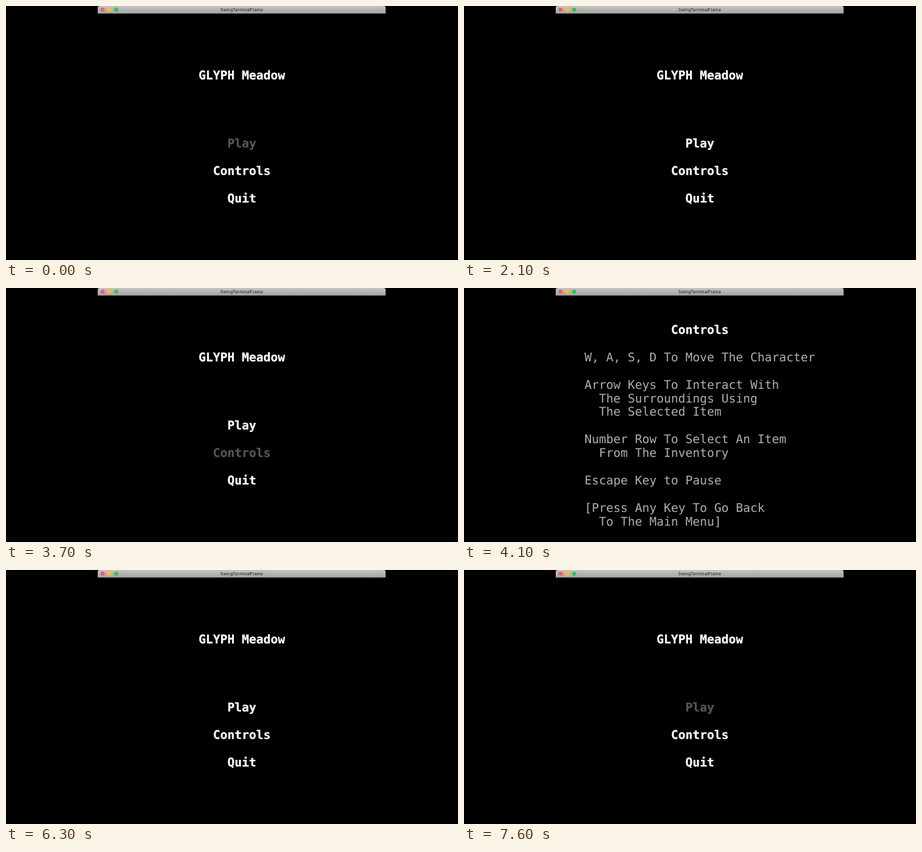
Recreate the animation shown at these times as an HTML page. Size 690 by 388 pixels, loop 8 s.

```html
<!DOCTYPE html>
<html lang="en">
<head>
<meta charset="utf-8">
<title>Terminal menu</title>
<style>
  html, body { margin: 0; width: 100%; height: 100%; overflow: hidden; background: #000; }
  svg { display: block; width: 690px; height: 388px; }
  text { white-space: pre; text-rendering: geometricPrecision; }
  .term { font: 18.27px "DejaVu Sans Mono", monospace; color: #b0b0b0; fill: currentColor; }
  .bold { font-weight: bold; color: #fff; stroke: currentColor; stroke-width: .25px; }
  .bar { font: 6.62px Inter, "Liberation Sans", sans-serif; fill: #1c1c1c; }
</style>
</head>
<body>
<svg viewBox="0 0 690 388">
  <defs>
    <linearGradient id="metal" x2="0" y2="1">
      <stop offset="0" stop-color="#c4c4c4"/>
      <stop offset="1" stop-color="#a4a4a4"/>
    </linearGradient>
  </defs>
  <path d="M140 11.6V3q0-3 3-3H576.5q3 0 3 3V11.6Z" fill="url(#metal)"/>
  <circle cx="147.5" cy="5.6" r="3.2" fill="#fc5b55"/>
  <circle cx="157.9" cy="5.6" r="3.2" fill="#fdbc38"/>
  <circle cx="168.2" cy="5.6" r="3.2" fill="#2fc740"/>
  <text class="bar" x="359.7" y="8.1" text-anchor="middle">SwingTerminalFrame</text>
  <g id="menu"></g>
  <g id="help"></g>
</svg>
<script>
const LOOP = 8000;
const menu = document.getElementById('menu');
const help = document.getElementById('help');

// Places text on the 40-column terminal grid.
function put(parent, col, row, str, bold) {
  const t = document.createElementNS('http://www.w3.org/2000/svg', 'text');
  t.setAttribute('class', bold ? 'term bold' : 'term');
  t.setAttribute('x', 140 + col * 11);
  t.setAttribute('y', 28 + row * 20.93);
  t.textContent = str;
  parent.append(t);
  return t;
}

put(menu, 14, 4, 'GLYPH Meadow', true);
const play = put(menu, 18, 9, 'Play', true);
const controls = put(menu, 16, 11, 'Controls', true);
put(menu, 18, 13, 'Quit', true);

put(help, 16, 2, 'Controls', true);
[
  [4, 4, 'W, A, S, D To Move The Character'],
  [4, 6, 'Arrow Keys To Interact With'],
  [6, 7, 'The Surroundings Using'],
  [6, 8, 'The Selected Item'],
  [4, 10, 'Number Row To Select An Item'],
  [6, 11, 'From The Inventory'],
  [4, 13, 'Escape Key to Pause'],
  [4, 15, '[Press Any Key To Go Back'],
  [6, 16, 'To The Main Menu]']
].forEach(line => put(help, ...line));

// Spans in ms during which something is dimmed or shown.
const playDim = [[0, 100], [700, 1100], [1600, 2100], [2600, 3000], [7600, LOOP]];
const controlsDim = [[3000, 3100], [3700, 4100], [6600, 6900]];
const helpShown = [[4100, 6300]];

const within = (spans, t) => spans.some(([a, b]) => t >= a && t < b);
const shade = (el, dim) => { el.style.color = dim ? '#555' : '#fff'; };
const show = (el, on) => { el.style.display = on ? '' : 'none'; };

function draw(now) {
  const t = now % LOOP;
  const helping = within(helpShown, t);
  show(help, helping);
  show(menu, !helping);
  shade(play, within(playDim, t));
  shade(controls, within(controlsDim, t));
}

const start = performance.now();
function tick() {
  draw(performance.now() - start);
  requestAnimationFrame(tick);
}
tick();
</script>
</body>
</html>
```
